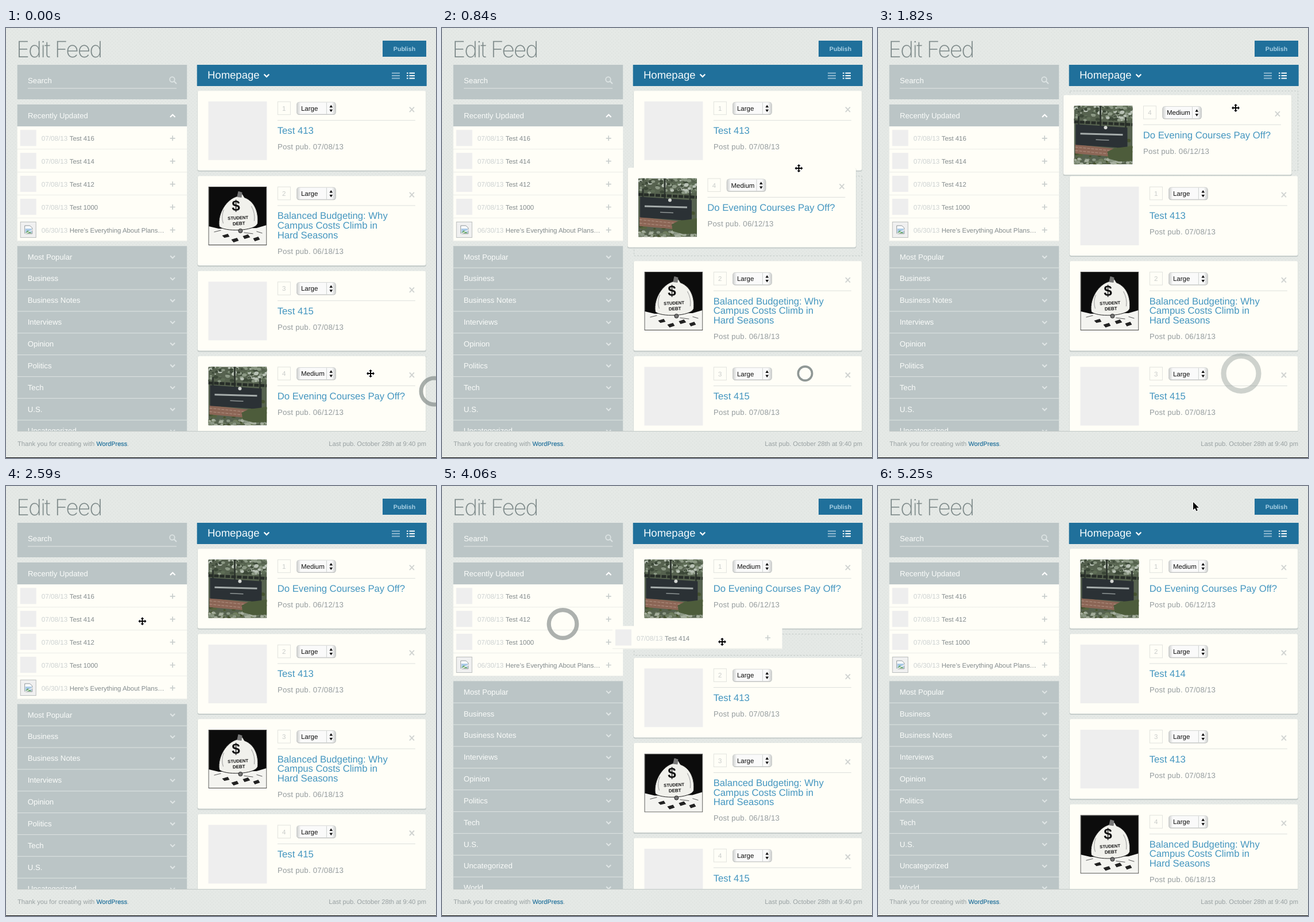
Write an HTML page that moves like this. It is 749x748 px and loops after 5320 ms.

```html
<!DOCTYPE html>
<html lang="en">
<head>
<meta charset="utf-8">
<title>Edit Feed</title>
<style>
html, body { margin: 0; width: 100%; height: 100%; overflow: hidden; background: #e4e8e5; }
svg { display: block; width: 749px; height: 748px; }
text { font-family: "Liberation Sans", Arial, sans-serif; white-space: pre; text-rendering: geometricPrecision; }
.heading { font-family: Inter, "Liberation Sans", sans-serif; font-weight: 250; letter-spacing: -1.9px; }
</style>
</head>
<body>
<svg id="stage" viewBox="0 0 749 748" xmlns="http://www.w3.org/2000/svg"></svg>
<script>
const LOOP = 5320, STEP = 70;
const DROP = 1960, GRAB = 2940, LAND = 4340;
const CREAM = '#fffef7', PANEL = '#bbc5c6', BLUE = '#20709b';
const LEFT = 19.7, WIDE = 295.5, ROW = 39.9, CAT = 37.85;
const LIST_TOP = 171.3, FEED_TOP = 109.2, FEED_LEFT = 333.9, GAP = 9.7;

const text = (x, y, size, fill, str, extra = '') =>
  `<text x="${x}" y="${y}" font-size="${size}" fill="${fill}" ${extra}>${str}</text>`;
const rect = (x, y, w, h, fill, extra = '') =>
  `<rect x="${x}" y="${y}" width="${w}" height="${h}" fill="${fill}" ${extra}/>`;
const line = (d, stroke, width = 1, extra = '') =>
  `<path d="${d}" fill="none" stroke="${stroke}" stroke-width="${width}" ${extra}/>`;
const shape = (d, fill, extra = '') => `<path d="${d}" fill="${fill}" ${extra}/>`;

let seed = 7;
const random = () => (seed = seed * 16807 % 2147483647) / 2147483647;

// Speckled foliage between two heights
function leaves(count, y0, y1, colors) {
  return Array.from({ length: count }, () => {
    const x = random() * 102, y = y0 + random() * (y1 - y0), r = 1 + random() * 2;
    const fill = colors[Math.floor(random() * colors.length)];
    return `<ellipse cx="${x.toFixed(1)}" cy="${y.toFixed(1)}" rx="${(r * 1.4).toFixed(1)}" ry="${r.toFixed(1)}" fill="${fill}"/>`;
  }).join('');
}

const signPic = rect(0, 0, 102, 102, '#56624f') +
  leaves(130, 0, 26, ['#3c4838', '#5f6e57', '#8b9884', '#b9c2b6']) +
  line('M8 18V40M46 0V36M90 20V66', '#2f372f', 3) +
  line('M0 28 102 33', '#272d28', 5, 'stroke-dasharray="8 2"') +
  leaves(70, 60, 102, ['#55633f', '#6f7d58', '#44512f']) +
  shape('M2 67 82 76V90L2 83Z', '#8c6656') +
  line('M2 72 82 80M2 78 82 86', '#b29384', 1, 'stroke-dasharray="5 2"') +
  shape('M3 32 93 38V74L3 68Z', '#2b3135') +
  leaves(60, 92, 102, ['#8b9784', '#6f7d63', '#a5ae9d']) +
  shape('M58 80 70 74 102 70V96L78 97 60 92Z', '#4d5c3b') +
  line('M11 48.5 85 50.5', '#a5acab', 3) + line('M38 59 61 60', '#8f9696', 1.5) +
  '<circle cx="55" cy="38" r="3" fill="#d4d6d3"/>';

const bagPic = rect(0, 0, 102, 102, '#f4f4f0') +
  shape('M1 1H101V67L84 72 18 73 1 69Z', '#0c0c0c') +
  shape('M50 17 54 8 60 14 63 19C80 25 88 44 86 64 82 78 26 79 19 69 16 46 32 22 50 17Z', '#f1f1ec', 'stroke="#222"') +
  shape('M52 8 59 10 58 19 50 18Z', '#777') +
  line('M27 40Q22 52 26 64M75 34Q82 46 80 60', '#999') +
  text(48, 42, 26, '#111', '$', 'text-anchor="middle" font-weight="bold"') +
  `<g transform="rotate(-3 52 60)" font-weight="bold" text-anchor="middle">
    ${text(52, 57, 7.6, '#111', 'STUDENT')}${text(53, 67, 8, '#111', 'DEBT')}</g>` +
  '<circle cx="56" cy="77" r="3.5" fill="#777" stroke="#222"/>' +
  shape('M24 85 34 82 37 87 28 89ZM40 92 50 89 53 94 44 97ZM60 86 69 83 73 88 63 91ZM78 90 87 87 90 92 81 95Z', '#222') +
  line('M10 79 22 76M62 80 78 82M84 78 94 81', '#555') + rect(.5, .5, 101, 101, 'none', 'stroke="#333"');

const defs = `<defs>
  <pattern id="paper" width="6" height="6" patternUnits="userSpaceOnUse">
    ${rect(0, 0, 6, 6, '#e5e9e6')}${rect(1, 1, 1.4, 1.4, '#dce1de')}${rect(4, 4, 1.4, 1.4, '#dce1de')}
  </pattern>
  <linearGradient id="button">
    <stop stop-color="#cdcfce"/><stop offset=".1" stop-color="#fafafa"/>
    <stop offset=".9" stop-color="#fafafa"/><stop offset="1" stop-color="#cdcfce"/>
  </linearGradient>
  <clipPath id="view">${rect(0, 0, 749, 701, '#000')}</clipPath>
  <clipPath id="frame">${rect(0, 0, 102, 102, '#000')}</clipPath>
  <g id="blank">${rect(0, 0, 102, 102, '#eee')}</g>
  <g id="sign" clip-path="url(#frame)">${signPic}</g>
  <g id="bag" clip-path="url(#frame)">${bagPic}</g>
</defs>`;

// Feed cards
const card = (title, date, size = 'Large', pic = 'blank') =>
  ({ title, date, size, pic, height: 138.5 + (title.length > 1 ? 17.2 : 0) });
const cards = {
  a: card(['Test 413'], '07/08/13'),
  b: card(['Balanced Budgeting: Why', 'Campus Costs Climb in', 'Hard Seasons'], '06/18/13', 'Large', 'bag'),
  c: card(['Test 415'], '07/08/13'),
  e: card(['Test 414'], '07/08/13'),
  d: card(['Do Evening Courses Pay Off?'], '06/12/13', 'Medium', 'sign')
};

function cardArt(key) {
  const { title, date, size, pic, height } = cards[key];
  return `<g id="card-${key}">
    ${rect(-.5, .5, 398.5, height + 1.6, '#bcc4c2', 'rx="3" opacity=".75"')}
    ${rect(0, 0, 397.5, height, CREAM, 'rx="3"')}
    <use href="#${pic}" x="18.5" y="18.5"/>
    ${rect(139.5, 19, 22, 22.5, 'none', 'stroke="#e2e3de"')}
    ${text(150.4, 34.6, 11.5, '#c9ccca', '', 'text-anchor="middle" class="rank"')}
    ${rect(172.3, 20, 68.5, 21.8, '#b4b6b5', 'rx="4.5"')}
    ${rect(172.8, 19.8, 67.4, 21, 'url(#button)', 'rx="4" stroke="#cfd1d0" stroke-width=".8"')}
    ${rect(224, 20.5, 1, 20, '#cfd1d0')}
    ${shape('M229.5 29 232.3 24.5 235.1 29ZM229.5 32.5H235.1L232.3 37Z', '#111')}
    ${text(180, 34.6, 11.5, '#111', size)}
    ${line('M369 28.5 377 37M377 28.5 369 37', '#d0d3d1', 1.9)}
    ${rect(139, 51, 240, 1, '#dcdfdc')}
    ${title.map((s, i) => text(138.8, 75 + i * 16.6, 16.7, '#4496c0', s)).join('')}
    ${text(139, 102 + (title.length - 1) * 16.6, 13.2, '#959c9e', 'Post pub. ' + date, 'letter-spacing=".25"')}
  </g>`;
}

// Left-hand list
const posts = ['Test 416', 'Test 414', 'Test 412', 'Test 1000', 'Here’s Everything About Plans…'];
const topics = ['Most Popular', 'Business', 'Business Notes', 'Interviews', 'Opinion',
  'Politics', 'Tech', 'U.S.', 'Uncategorized', 'World'];

const brokenPic = rect(5.5, 6.5, 27, 27, '#f0f0f0', 'stroke="#b9bdbd"') +
  shape('M13 13H22L26 17V27H13Z', '#fff', 'stroke="#8d9599"') +
  rect(14, 18, 11, 8, '#a9c9e6') + shape('M14 26 18 21 25 26Z', '#5fa35a') + line('M12 28 27 20', '#f0f0f0', 1.5);

const postArt = i => `<g id="post-${i}">
  ${rect(0, 0, WIDE, ROW, CREAM)}${rect(0, ROW - 1, WIDE, 1, '#ecede8')}
  ${i === 4 ? brokenPic : rect(5, 6, 28, 28, '#eee')}
  ${text(42, 25, 11.7, '#cdd2d2', i === 4 ? '06/30/13' : '07/08/13')}${text(91, 25, 11.4, '#838b8d', posts[i])}
  ${line('M266 20.5H275M270.5 16V25', '#c9cecd', 1.7)}</g>`;

const topicArt = (name, i) => {
  const y = i * CAT;
  return rect(0, y, WIDE, CAT, PANEL) + (i ? rect(0, y - .5, WIDE, 1, '#dde3e2') : '') +
    text(18, y + 23.3, 13.2, '#fafcfa', name) + line(`M266.5 ${y + 17}l4 4 4-4`, '#dfe5e5', 2);
};

const bars = (x, w) => [78.5, 83, 87.5].map(y => `M${x} ${y}h${w}`).join('');
const chrome = rect(0, 0, 749, 748, 'url(#paper)') +
  text(18, 50.5, 39, '#7d8989', 'Edit Feed', 'class="heading"') +
  rect(656, 22, 76, 28, BLUE) +
  text(694, 40, 10.6, '#a9d0e4', 'Publish', 'font-weight="bold" text-anchor="middle"') +
  rect(LEFT, 64, WIDE, 60, PANEL) + text(38, 96.3, 13.2, '#fafcfa', 'Search') + rect(38, 104.5, 259, 1, '#e3e8e8') +
  '<circle cx="289.5" cy="89.5" r="4.3" fill="none" stroke="#dde4e4" stroke-width="1.7"/>' +
  line('M292.8 92.8 297 97', '#dde4e4', 2) +
  rect(LEFT, 133, WIDE, 38, PANEL) + text(38, 156.7, 13.2, '#fafcfa', 'Recently Updated') +
  line('M286 155l4.3-4.2 4.3 4.2', '#fff', 2.2) +
  rect(332.7, 64, 400, 37, BLUE) + text(351, 88, 18.5, '#f4fafc', 'Homepage') +
  line('M449.5 80.5l4.4 4.4 4.4-4.4', '#fff', 2.2) +
  line(bars(672, 14), '#8fb8cf', 1.8) + line(bars(698, 2.5) + bars(702.5, 9.5), '#fff', 2);

const footer = rect(LEFT, 701, 712, 1, '#c1c8c6') +
  text(20, 727, 11.2, '#99a1a2', `Thank you for creating with <tspan fill="${BLUE}" stroke="${BLUE}" stroke-width=".2" font-size="10.9">WordPress</tspan>.`) +
  text(732, 727, 11.2, '#99a1a2', 'Last pub. October 28th at 9:40 pm', 'text-anchor="end"') +
  rect(0, 747, 749, 1, '#000');

// Click rings, each growing at the same rate
const rings = [{ x: 746, y: 632, start: -1230 }, { x: 632.5, y: 601, start: 190 }, { x: 210.5, y: 240, start: 2760 }];

const outline = 'stroke="#fff" stroke-width="1.7" paint-order="stroke"';
const svg = document.getElementById('stage');
svg.innerHTML = defs + chrome + `<g clip-path="url(#view)">
    <g id="topics">${topics.map(topicArt).join('')}</g>
    ${[0, 2, 3, 4].map(postArt).join('')}
    ${rect(0, 0, 0, 0, 'none', 'id="gap" stroke="#c3cac7" stroke-dasharray="3 2.5"')}
    ${Object.keys(cards).map(cardArt).join('')}
    ${postArt(1)}
  </g>` + footer +
  rings.map((r, i) => `<circle id="ring-${i}" cx="${r.x}" cy="${r.y}" fill="none" stroke="#8b9391"/>`).join('') +
  shape('M0-7 3-4H1V-1H4V-3L7 0 4 3V1H1V4H3L0 7-3 4H-1V1H-4V3L-7 0-4-3V-1H-1V-4H-3Z', '#000', 'id="move" ' + outline) +
  shape('M0 0V13.5L3.2 10.6 5.4 15.6 7.7 14.6 5.5 9.8H9.8Z', '#000', 'id="arrow" ' + outline);

const $ = id => document.getElementById(id);
const show = (id, on) => $(id).style.display = on ? '' : 'none';
const place = (id, x, y) => $(id).setAttribute('transform', `translate(${x.toFixed(2)} ${y.toFixed(2)})`);
const set = (id, attrs) => Object.entries(attrs).forEach(([k, v]) => $(id).setAttribute(k, v));

// Pointer strokes: from, to, x, y, ease-out power
const strokes = [
  [210, 560, 632, 361, 1.2], [560, 1120, 618, 205, 2], [1120, 1820, 623, 139, 2], [1820, DROP, 632, 126, 1],
  [DROP, 2380, 320, 221, 1], [2450, 2730, 210, 240, 2], [2870, 4060, 488, 271, 1.3], [4060, 4270, 496, 271, 1],
  [4550, 4900, 585, 92, 1], [5040, 5250, 549, 28, 1]
];

function pointerAt(t) {
  let x = 635, y = 601;
  for (const [from, to, tx, ty, power] of strokes) {
    if (t <= from) break;
    const p = 1 - (1 - Math.min(1, (t - from) / (to - from))) ** power;
    x += (tx - x) * p;
    y += (ty - y) * p;
  }
  return [x, y];
}

// The held card trails the pointer by one step
function heldCard(t) {
  const [x, y] = pointerAt(t - STEP);
  return [Math.min(FEED_LEFT, x - 300), Math.min(570.8, y - 23)];
}

// The gap opens below every card whose middle is above the held one
function orderWithGap(top) {
  let y = FEED_TOP, above = '', below = '';
  for (const k of 'abc') {
    const h = cards[k].height;
    if (y + h / 2 < top) above += k; else below += k;
    y += h + GAP;
  }
  return above + '_' + below;
}

function drawFeed(t, left) {
  const held = heldCard(t);
  const order = t < DROP ? orderWithGap(held[1]) : t >= LAND ? 'deabc' : left ? 'd.abc' : 'dabc';
  const ranks = t < DROP ? 'abcd' : order.replace('.', '');
  let y = FEED_TOP;
  for (const k of order) {
    const height = k === '_' ? 138.5 : k === '.' ? 36.8 : cards[k].height;
    if (cards[k]) place('card-' + k, FEED_LEFT, y);
    else set('gap', { x: 334.5, y: y + .3, width: 397, height });
    y += height + (k === '.' ? 4.7 : GAP);
  }
  if (t < DROP) place('card-d', ...held);
  for (const k in cards) {
    show('card-' + k, ranks.includes(k));
    $('card-' + k).querySelector('.rank').textContent = ranks.indexOf(k) + 1;
  }
}

function drawList(t, [x, y], left) {
  const held = t >= GRAB, shift = left ? -ROW : held ? 1.6 : 0;
  posts.forEach((_, i) => place('post-' + i, LEFT, LIST_TOP + i * ROW + (i > 1 ? shift : 0)));
  place('topics', LEFT, 379.3 + shift);
  if (held) place('post-1', x - 191, y - 27.5);
  if (held && !left) set('gap', { x: 20.2, y: LIST_TOP + ROW + .5, width: WIDE - 1, height: 37 });
  show('post-1', t < LAND);
}

function drawRing({ start }, i, t) {
  const outer = (t - start) * .0215, width = outer * .26, on = outer > 0 && outer < 39.3;
  show('ring-' + i, on);
  if (on) set('ring-' + i, { r: outer - width / 2, 'stroke-width': width, opacity: 1 - .8 * (outer / 39) ** 3 });
}

function draw(t) {
  const pointer = pointerAt(t), left = t >= GRAB && pointer[0] > 370, arrow = t >= 4900;
  drawFeed(t, left);
  drawList(t, pointer, left);
  show('gap', t < DROP || (t >= GRAB && t < LAND));
  rings.forEach((r, i) => drawRing(r, i, t));
  show('move', !arrow);
  show('arrow', arrow);
  place(arrow ? 'arrow' : 'move', ...pointer);
}

const start = performance.now();
function tick() {
  const t = (performance.now() - start) % LOOP;
  draw(Math.floor(t / STEP) * STEP);
  requestAnimationFrame(tick);
}
tick();
</script>
</body>
</html>
```
